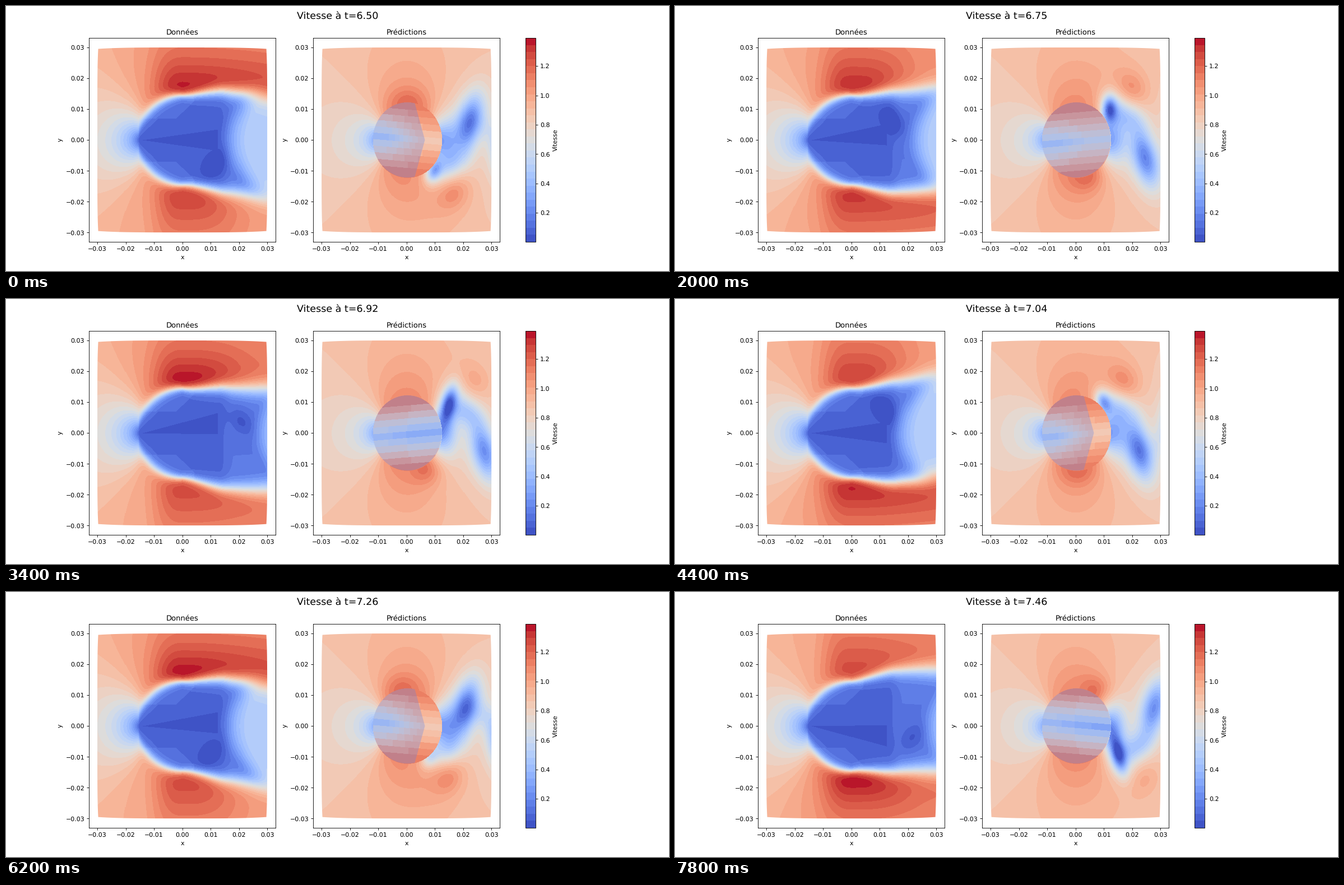
Write a matplotlib script that moves like this. It is 1183x473 px and loops after 8000 ms.

```python
import numpy as np
import matplotlib.pyplot as plt
from matplotlib.animation import FuncAnimation
from matplotlib.cm import ScalarMappable
from matplotlib.colors import ListedColormap, Normalize
from matplotlib.patches import Polygon

W, H, DPI = 1183, 473, 1183 / 15
FRAMES, INTERVAL = 40, 200
T0, DT = 6.5, 0.0246
PHASE0, SHED_RATE = 0.70, 0.1595      # shedding phase, in cycles per frame
BANDS = 29
MM = 1e-3

# Grid in millimetres, about one sample per pixel
X, Y = np.meshgrid(np.linspace(-30.1, 30.1, 303), np.linspace(-30.1, 30.1, 333))
DOWN, UP = np.maximum(X, 0), np.maximum(-X, 0)
TAU = 2 * np.pi


def wave(phase):
    return np.cos(TAU * phase)


def ramp(t, start, length):
    """Smooth step from 0 to 1."""
    t = np.clip((t - start) / length, 0, 1)
    return t * t * (3 - 2 * t)


def pulse(t, length):
    return np.sin(np.pi * np.clip(t / length, 0, 1))


def potential(x, y, radius, speed):
    """Speed of the ideal flow round a cylinder."""
    z = x + 1j * y
    z = np.where(np.abs(z) < 5, 5, z)
    return np.maximum(speed * np.abs(1 - radius**2 / z**2), 0.02)


def soft_min(a, b, n=14):
    return (a**-n + b**-n) ** (-1 / n)


def blob(cx, cy, along, across, degrees=0):
    c, s = np.cos(np.radians(degrees)), np.sin(np.radians(degrees))
    u = (X - cx) * c + (Y - cy) * s
    v = (Y - cy) * c - (X - cx) * s
    return np.exp(-0.5 * ((u / along) ** 2 + (v / across) ** 2))


def sides(p):
    """Upper and lower side, half a cycle apart."""
    return (1, p % 1), (-1, (p + 0.5) % 1)


# ---- Left panel: wide wake behind a wedge-shaped body ----
DATA_POT = potential(np.where(X > 0, 0.2 * X, X), Y, 14.5, 0.94)
ROUND = 1 - (UP / 15.5) ** 2
NOSE = 14.5 * np.sign(ROUND) * np.sqrt(np.abs(ROUND))
SHEAR = 0.6 + 0.04 * DOWN + 0.06 * UP


def data_half(q):
    """Outer speed and wake mask for the upper side at phase q."""
    core = 1.33 + 0.08 * wave(q - 0.53)
    tail = 1.20 + 0.15 * wave(q - 0.68)
    cap = core + (tail - core) * ramp(X, 4, 24)
    outer = soft_min(DATA_POT, cap * (1 - 0.2 * ramp(UP, 2, 13)))
    sway = 3.4 * DOWN / 30 * wave(q - 0.07 + (30 - DOWN) / 200)
    edge = NOSE + 1.8 * ramp(X, 0, 16) + sway
    mask = 1 / (1 + np.exp(-np.clip((np.abs(Y) - edge) / SHEAR, -40, 40)))
    return outer, mask


def data_field(p):
    top, low = data_half(p), data_half(p + 0.5)
    outer, mask = (np.where(Y > 0, a, b) for a, b in zip(top, low))

    start = 17.5 - 5.5 * wave(2 * (p - 0.17)) + 0.035 * Y**2
    inner = 0.085 + 0.36 * ramp(X, start, 11) + 0.06 * ramp(X, 13, 5)
    tilt = 0.12 * wave(p - 0.45)
    wedge = (np.abs(Y - tilt * (X + 14)) < 0.13 * (X + 14)) & (X < 12.5)
    facet = (np.abs(Y) > 9 + 0.9 * X) & (np.abs(Y) > 7) & (X < 4)
    inner = inner - 0.04 * wedge + 0.04 * facet
    for side, q in sides(p):
        spot = blob(8 + 75 * q * q, side * (12 - 20 * q), 3.6, 2.5, -50 * side)
        inner = inner - 0.15 * pulse(q, 0.55) * spot
    inner = np.maximum(inner, 0.02)
    return inner + (outer - inner) * mask


# ---- Right panel: vortices shed by a cylinder ----
PRED_BASE = (soft_min(potential(X, Y, 9, 0.87), 1.07)
             + 0.10 * ramp(X, 14, 6) * np.exp(-(Y / 9) ** 2)
             - 0.12 * blob(14, 0, 3, 5))
CYLINDER = np.hypot(X - 0.3, Y) < 12.2


def cool_vortex(q, side):
    """Slow core that drifts downstream, grows and turns upright."""
    x, y = 4.5 + 25 * q, side * (10 - 4.5 * ramp(q, 0.3, 0.4))
    depth = 0.62 * ramp(q, 0, 0.3) * (1 - 0.25 * q)
    along = 2.5 + 4 * ramp(q, 0.2, 0.45)
    across = 1.8 + 1.2 * ramp(q, 0.4, 0.3)
    turn = side * (130 - 56 * ramp(q, 0.1, 0.3))
    return (depth * blob(x, y, along, across, turn)
            + 0.3 * depth * blob(x, y, along + 2, across + 1.5, turn)
            + 0.28 * pulse(q, 0.75) * blob(x + 6, y - 2 * side, 5, 3, -35 * side))


def hot_spot(q, side):
    """Fast patch that leaves the shoulder and follows the wake."""
    x, y = -3 + 33 * (q - 0.6), side * (12 + 5 * ramp(q, 0.9, 0.3))
    gain = 0.13 * ramp(q, 0.4, 0.3) * (1 - ramp(q, 1.3, 0.3))
    turn = -45 * side * ramp(q, 0.9, 0.25)
    return gain * (blob(x, y, 4, 3.2, turn)
                   + 0.6 * ramp(q, 0.9, 0.3) * blob(x, y, 7, 5.5, turn))


def body_field(p):
    """Flat strips that bridge the body from rim to rim."""
    side = 1 if p % 1 < 0.5 else -1
    rear = 0.62 + 0.24 * wave(2 * (p - 0.18))
    mid = 0.5 + (rear - 0.5) * ramp(X, -9, 16)
    strip = np.round((Y - side * 0.08 * (X - 6)) / 2.1) * 2.1
    return mid + (1.12 - mid) * np.clip(np.abs(strip) / 10, 0, 1)


def pred_field(p):
    v = PRED_BASE.copy()
    for side, q in sides(p):
        for age in (q, q + 1):
            v += hot_spot(age, side) - cool_vortex(age, side)
    return np.maximum(np.where(CYLINDER, body_field(p), v), 0.03)


def veil_outline(p):
    """Body outline, cut short at the rear early in each half cycle."""
    reach = np.clip(20 - 40 * wave(2 * (p - 0.18)), 6.5, 17)
    t = np.linspace(0, TAU, 57)
    x, y = 0.3 + 12.2 * np.cos(t), 12.2 * np.sin(t)
    return np.column_stack([np.minimum(x, reach - 0.3 * np.abs(y)), y]) * MM


# ---- Figure ----
plt.rcParams["font.family"] = "DejaVu Sans"
plt.rcParams["text.hinting"] = "none"
fig, axes = plt.subplots(1, 2, figsize=((W + 1e-6) / DPI, (H + 1e-6) / DPI), dpi=DPI)
fig.subplots_adjust(top=0.879)
cmap = ListedColormap(plt.get_cmap("coolwarm")((np.arange(BANDS) + 0.5) / BANDS))
norm = Normalize(0.0016, 1.391)

t = np.linspace(-1, 1, 41)
top_edge = np.column_stack([29.7 * t, 29.95 - 0.45 * t**4])
right_edge = np.column_stack([30 - 0.3 * t**6, -29.5 * t])
domain = np.vstack([top_edge, right_edge, -top_edge, -right_edge]) * MM


def add_panel(ax, title):
    image = ax.imshow(np.zeros_like(X), origin="lower", aspect="auto", cmap=cmap,
                      norm=norm, interpolation="nearest",
                      extent=np.array([-30.2, 30.2, -30.2, 30.2]) * MM)
    image.set_clip_path(Polygon(domain, transform=ax.transData))
    ticks = np.arange(-3, 4) / 100
    ax.set(xlim=(-0.033, 0.033), ylim=(-0.033, 0.033), xticks=ticks, yticks=ticks,
           xlabel="x", ylabel="y", title=title)
    ax.xaxis.set_major_formatter("{x:.2f}")
    ax.yaxis.set_major_formatter("{x:.2f}")
    return image


data_image = add_panel(axes[0], "Données")
pred_image = add_panel(axes[1], "Prédictions")
veil = Polygon(veil_outline(PHASE0), closed=True, lw=0, alpha=0.3,
               fc=(0.39, 0.52, 0.9))
axes[1].add_patch(veil)
fig.colorbar(ScalarMappable(norm, cmap), ax=list(axes), label="Vitesse",
             ticks=np.arange(1, 7) / 5)
heading = fig.suptitle("", fontsize=16)


def update(frame):
    phase = PHASE0 + SHED_RATE * frame
    data_image.set_data(data_field(phase))
    pred_image.set_data(pred_field(phase))
    veil.set_xy(veil_outline(phase))
    heading.set_text(f"Vitesse à t={T0 + DT * frame:.2f}")
    return data_image, pred_image, veil, heading


anim = FuncAnimation(fig, update, frames=FRAMES, interval=INTERVAL, repeat=True)
plt.show()
```
